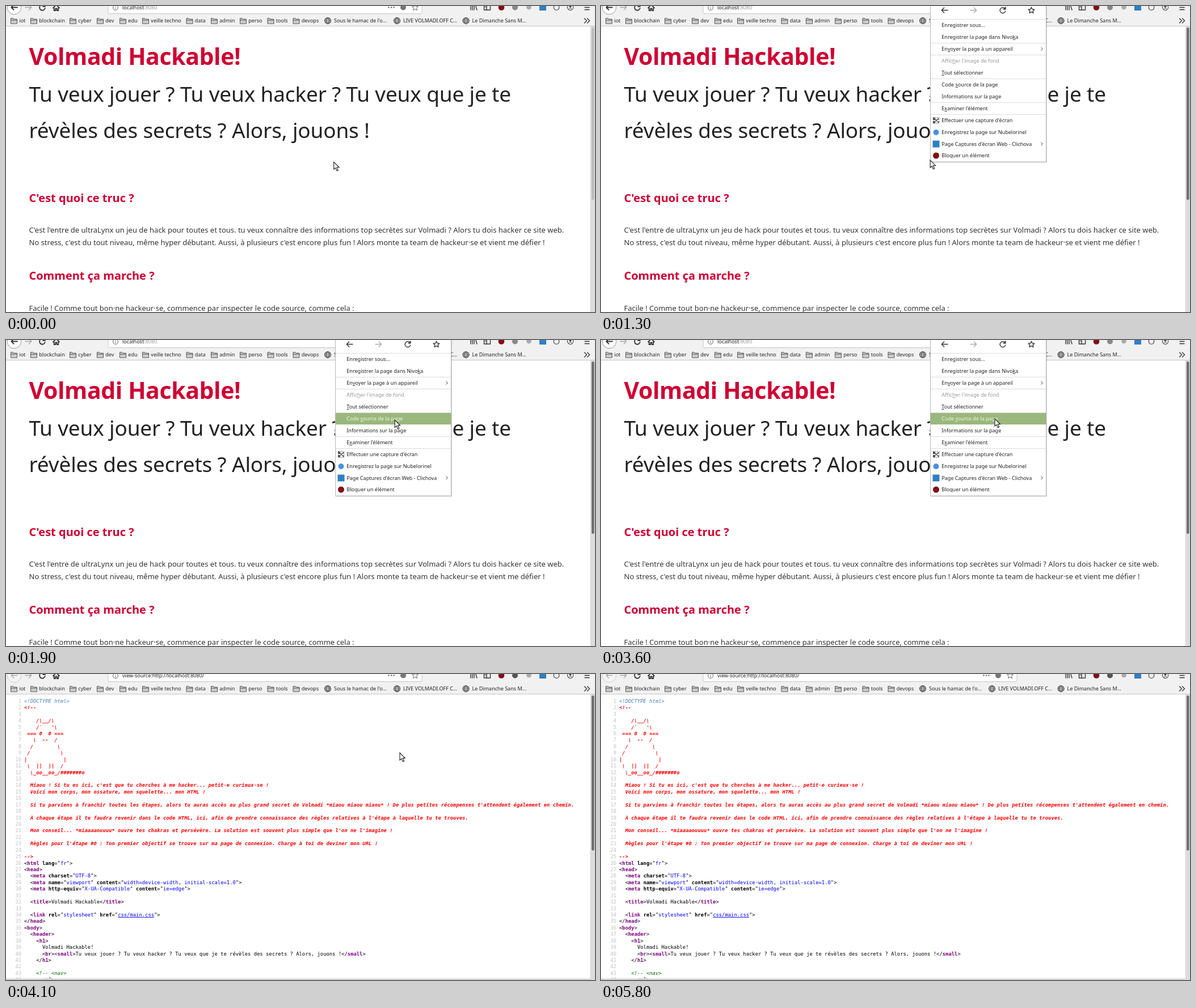
Recreate the animation shown at these times as an HTML page. Size 1038 by 540 pixels, loop 6.1 s.

```html
<!DOCTYPE html>
<html lang="fr">
<head>
<meta charset="utf-8">
<title>Code source de la page</title>
<style>
  html, body { margin: 0; width: 100%; height: 100%; overflow: hidden; background: #fff; }
  svg { display: block; width: 100%; height: 100%; }
  text { white-space: pre; font-family: "Noto Sans", "Open Sans", sans-serif; font-size: 9.05px; fill: #222; }
  .line { fill: none; stroke: #333; stroke-width: 1.4; stroke-linecap: round; stroke-linejoin: round; }
  .thin { stroke-width: 1; }
  .bold { stroke-width: 1.8; }
  .grey { stroke: #666; }
  .off { stroke: #aaa; }
  .folder { fill: #ccc; stroke: #555; }
  .red { font-weight: bold; fill: #ce0033; }
  .h1 { font-size: 41px; letter-spacing: -.4px; }
  .h3 { font-size: 20px; }
  .lead { font-size: 37px; letter-spacing: -.17px; }
  .body { font-size: 13px; fill: #333; }
  .key { text-decoration: underline; }
  .mono text { font-family: "DejaVu Sans Mono", monospace; font-size: 8.86px; fill: #000; }
  .mono .num { fill: #c2c2c2; text-anchor: end; }
  .mono .err { fill: #f00; font-weight: bold; font-style: italic; }
  .mono .doctype { fill: #4682b4; font-style: italic; }
  .mono .com { fill: #006400; font-style: italic; }
  .tag { fill: #800080; font-weight: bold; }
  .attr { font-weight: bold; }
  .val { fill: #00f; }
</style>
</head>
<body>
<svg id="stage" viewBox="0 0 1038 540" xml:space="preserve"></svg>

<script type="text/plain" id="listing">
<!DOCTYPE html>
<!--

    /\__/\
    /`   '\
 === 0  0 ===
   \  --  /
  /        \
 /          \
|            |
 \  ||  ||  /
  \_oo__oo_/#######o

  Miaou ! Si tu es ici, c'est que tu cherches à me hacker... petit·e curieux·se !
  Voici mon corps, mon ossature, mon squelette... mon HTML !

  Si tu parviens à franchir toutes les étapes, alors tu auras accès au plus grand secret de Volmadi *miaou miaou miaou* ! De plus petites récompenses t'attendent également en chemin.

  À chaque étape il te faudra revenir dans le code HTML, ici, afin de prendre connaissance des règles relatives à l'étape à laquelle tu te trouves.

  Mon conseil... *miaaaaouuuu* ouvre tes chakras et persévère. La solution est souvent plus simple que l'on ne l'imagine !

  Règles pour l'étape #0 : Ton premier objectif se trouve sur ma page de connexion. Charge à toi de deviner mon URL !

-->
<html lang="fr">
<head>
  <meta charset="UTF-8">
  <meta name="viewport" content="width=device-width, initial-scale=1.0">
  <meta http-equiv="X-UA-Compatible" content="ie=edge">

  <title>Volmadi Hackable</title>

  <link rel="stylesheet" href="css/main.css">
</head>
<body>
  <header>
    <h1>
      Volmadi Hackable!
      <br><small>Tu veux jouer ? Tu veux hacker ? Tu veux que je te révèles des secrets ? Alors, jouons !</small>
    </h1>

    <!-- <nav>
      <ul>
</script>

<script>
const LOOP = 6100;
const $ = id => document.getElementById(id);

const rect = (x, y, w, h, fill, extra = '') =>
  `<rect x="${x}" y="${y}" width="${w}" height="${h}" fill="${fill}" ${extra}/>`;
const disc = (x, y, r, fill, extra = '') => `<circle cx="${x}" cy="${y}" r="${r}" fill="${fill}" ${extra}/>`;
const text = (x, y, str, cls = '', extra = '') => `<text x="${x}" y="${y}" class="${cls}" ${extra}>${str}</text>`;
const icon = (x, y, d, cls = '', extra = '') =>
  `<path transform="translate(${x} ${y})" d="${d}" class="line ${cls}" ${extra}/>`;
const group = (id, body, extra = '') => `<g id="${id}" ${extra}>${body}</g>`;

const LEFT = 'M5.5 0H-5M-.8 -4.4L-5.2 0L-.8 4.4';
const RIGHT = 'M-5.5 0H5M.8 -4.4L5.2 0L.8 4.4';
const RELOAD = 'M3.6 -3.2A4.9 4.9 0 1 0 4.8 1.4M4.9 -5.2V-1.6H1.3Z';
const STOP = 'M-4.5 -4.5L4.5 4.5M4.5 -4.5L-4.5 4.5';
const HOME = 'M-5.5 .3L0 -5L5.5 .3M-3.8 0V5H-1.2V1.5H1.2V5H3.8V0';
const STAR = 'M0 -5.3L1.6 -1.8L5.4 -1.4L2.6 1.2L3.4 5L0 3L-3.4 5L-2.6 1.2L-5.4 -1.4L-1.6 -1.8Z';
const GLOBE = 'M-5.5 0A5.5 5.5 0 1 0 5.5 0A5.5 5.5 0 1 0 -5.5 0H5.5M0 -5.5C-3.6 -2 -3.6 2 0 5.5C3.6 2 3.6 -2 0 -5.5M-4.6 -2.8H4.6M-4.6 2.8H4.6';
const FOLDER = 'M-5.5 4.8V-4.3H-1.5L-.3 -2.8H5.5V4.8ZM-5.5 -1H5.5';
const INFO = 'M-4.5 0A4.5 4.5 0 1 0 4.5 0A4.5 4.5 0 1 0 -4.5 0M0 -.3V2.2M0 -2.3V-2.2';
const LENS = 'M-4 -1A3.7 3.7 0 1 0 3.4 -1A3.7 3.7 0 1 0 -4 -1M2.5 2L6 5.5';
const SCISSORS = 'M-2.5 -2.5L4.5 3.5M-2.5 2.5L4.5 -3.5M-4.8 -3A1.3 1.3 0 1 0 -2.2 -3A1.3 1.3 0 1 0 -4.8 -3M-4.8 3A1.3 1.3 0 1 0 -2.2 3A1.3 1.3 0 1 0 -4.8 3';
const ARROW = 'M0 0V13L3 10.3L5.3 15.6L7.6 14.6L5.3 9.5H9.4Z';

function toolbar() {
  const folders = [['iot', 8], ['blockchain', 43], ['cyber', 112], ['dev', 160], ['edu', 200], ['veille techno', 240],
    ['data', 317.5], ['admin', 361], ['perso', 412], ['tools', 460.5], ['devops', 505.5]];
  const links = [["Sous le hamac de l'o...", 567], ['LIVE VOLMADI.OFF C...', 689], ['Le Dimanche Sans M...', 810.5]];
  return rect(0, 0, 1038, 36, '#f1f1f1') + rect(0, 35, 1038, 1, '#c6c6c6') +
    rect(180, -12, 553, 25.5, '#fff', 'rx="2" stroke="#c4c4c4"') +
    group('back', disc(14.5, 2.5, 12.3, '#fff', 'stroke="#999"') + icon(14.5, 2.5, LEFT, 'bold')) +
    group('backOff', disc(14.5, 2.5, 12.3, '#f4f4f4', 'stroke="#ccc"') + icon(14.5, 2.5, LEFT, 'off')) +
    icon(39.5, 2.5, RIGHT, 'off') + group('reload', icon(64, 2.5, RELOAD, 'bold')) + group('stop', icon(64, 2.5, STOP)) +
    icon(88.5, 3, HOME, 'bold') +
    group('loaded', icon(193, 3, INFO, 'thin grey') +
      [-4.5, 0, 4.5].map(dx => disc(679 + dx, 2.5, 1.2, '#666')).join('') +
      disc(700, 2.5, 5, '#777') + icon(721, 2.5, STAR, 'thin grey')) +
    group('search', icon(192, 2, LENS, 'grey')) +
    text(205, 6.3, '', '', 'id="url"') +
    icon(824, 2.5, 'M-5 -6V4.5M-2 -6V4.5M1 -6V4.5M3 -5L6 4.5') +
    icon(848, 2.5, 'M-5.5 -6V4.5H5.5V-6M-1 -6V4.5M-3.7 -1H-2.7') +
    disc(873, 2.5, 5.3, '#800f17') + disc(897, 2.5, 5, '#888', 'id="addon"') + disc(921.5, 2, 4.3, '#aaa') +
    rect(940, -4, 12, 12, '#2f7fc4') + disc(970, 2.5, 4.8, 'none', 'stroke="#555" stroke-width="1.3"') +
    icon(994.5, 2.5, 'M-5.2 0A5.2 5.2 0 1 0 5.2 0A5.2 5.2 0 1 0 -5.2 0M-3 3.4C-2 1.2 2 1.2 3 3.4', 'thin') +
    disc(994.5, 1, 1.9, '#444') + icon(1024, 2.5, 'M-4 -4H4M-4 0H4M-4 4H4') +
    folders.map(([name, x]) => icon(x + 6, 26, FOLDER, 'thin folder') + text(x + 15.3, 29, name)).join('') +
    links.map(([name, x]) => icon(x, 26, GLOBE, 'thin') + text(x + 11, 29, name)).join('') +
    icon(1024, 26, 'M-4.5 -4L-.5 0L-4.5 4M.5 -4L4.5 0L.5 4');
}

function homePage() {
  return text(40.5, 104, 'Volmadi Hackable!', 'red h1') +
    text(40.5, 168.5, 'Tu veux jouer ? Tu veux hacker ? Tu veux que je te', 'lead') +
    text(40.5, 232.5, 'révèles des secrets ? Alors, jouons !', 'lead') +
    text(40.5, 345.5, "C'est quoi ce truc ?", 'red h3') +
    text(40.5, 400, "C'est l'entre de ultraLynx un jeu de hack pour toutes et tous. tu veux connaître des informations top secrètes sur Volmadi ? Alors tu dois hacker ce site web.", 'body') +
    text(40.5, 421.5, "No stress, c'est du tout niveau, même hyper débutant. Aussi, à plusieurs c'est encore plus fun ! Alors monte ta team de hackeur·se et vient me défier !", 'body') +
    text(40.5, 482.5, 'Comment ça marche ?', 'red h3') +
    text(40.5, 538, 'Facile ! Comme tout bon·ne hackeur·se, commence par inspecter le code source, comme cela :', 'body');
}

const escape = s => s.replace(/</g, '&lt;');
const span = (cls, s) => `<tspan class="${cls}">${s}</tspan>`;

function highlight(line) {
  return line.replace(/<(\/?)(\w+)|([\w-]+)(?==")|"([^"]*)"/g, (all, slash, tag, attr, val) => {
    if (tag) return '&lt;' + slash + span('tag', tag);
    if (attr) return span('attr', attr);
    return '"' + span(val.endsWith('.css') ? 'val key' : 'val', val) + '"';
  });
}

function sourcePage() {
  const lines = $('listing').textContent.slice(1).trimEnd().split('\n');
  return lines.map((line, i) => {
    const n = i + 1, y = (50.8 + i * 11.43).toFixed(2);
    const cls = n === 1 ? 'doctype' : n <= 25 ? 'err' : n >= 43 ? 'com' : '';
    return text(27.2, y, n, 'num') + text(32, y, cls ? escape(line) : highlight(line), cls);
  }).join('') + rect(0, 537.5, 1030, 2.5, '#d2d2d2');
}

// An underscore marks the access key
const ITEMS = [['Enregistrer sous...', 34], ['Enregistrer la page dans Nivo_ka', 54.5], ['En_voyer la page à un appareil', 75.7],
  ["Affic_her l'image de fond", 97], ['_Tout sélectionner', 117.6], ['Code _source de la page', 139],
  ['Informations sur la page', 159.6], ["E_xaminer l'élément", 181], ["Effectuer une capture d'écran", 202],
  ['Enregistrez la page sur Nubelorinel', 222.7], ["Page Captures d'écran Web - Clichova", 243.3], ['Bloquer un élément', 264]];

function contextMenu() {
  const chevron = y => icon(777, y, 'M-1.2 -2.5L1.3 0L-1.2 2.5', 'thin');
  return rect(581, -5, 205, 281.5, '#000', 'opacity=".16"') +
    rect(580.5, -5, 204, 280, '#fff', 'stroke="#b5b5b5"') +
    icon(605.5, 7.5, LEFT) + icon(656.5, 7.5, RIGHT, 'off') + icon(708, 7.5, RELOAD) + icon(758.5, 7.5, STAR) +
    [23, 65, 86, 128, 170, 191].map(y => rect(581, y, 203, 1, '#dcdcdc')).join('') +
    rect(581, 129, 203.5, 20.3, '#9ab87c', 'id="hover"') +
    ITEMS.map(([s, y], i) => text(600.3, y + 3.3, s.replace(/_(.)/, (m, c) => span('key', c)), '', `id="item${i}"`)).join('') +
    chevron(75.7) + chevron(243.3) +
    icon(590.5, 202, 'M-5 -5H5V5H-5Z', 'thin', 'stroke-dasharray="1 2.3"') + icon(590.5, 202, SCISSORS) +
    disc(590.5, 223, 5, '#4a90e2') + rect(584.5, 237.5, 12, 12, '#2f7fc4') + disc(590.5, 264, 5.5, '#800f17');
}

$('stage').innerHTML = rect(0, 0, 1038, 540, '#fff') + group('home', homePage()) +
  group('source', sourcePage(), 'class="mono"') +
  group('scroll', rect(1029.5, 36, 8.5, 504, '#dcdcdc') + rect(1032, 38, 4.6, 304, '#bbb', 'id="thumb" rx="2"')) +
  toolbar() + group('menu', contextMenu()) +
  `<path id="cursor" d="${ARROW}" fill="#fff" stroke="#1a1a1a" stroke-width="1.1"/>`;

// Late pointer stops: [time, x, y]
const STOPS = [[3600, 694, 139], [4700, 612, 168], [4800, 403.5, 212], [4900, 489, 221],
  [5100, 301.5, 161.5], [5200, 306.5, 164], [5600, 211.5, 110.5]];

function pointer(t) {
  if (t < 3600) {
    const p = Math.min(7, Math.max(0, Math.floor((t - 1200) / 100))) / 7;
    const e = p * p * p * (p * (p * 6 - 15) + 10);
    return [577.7 + 107.5 * e, 275.3 - 134 * e];
  }
  return STOPS.filter(s => s[0] <= t).pop().slice(1);
}

const URLS = {
  home: `localhost<tspan fill="#999">:8080</tspan>`,
  blank: `<tspan fill="#888">Saisir un terme à rechercher ou une adresse</tspan>`,
  source: 'view-source:http://localhost:8080/'
};
let view;

function show(id, on) { $(id).style.display = on ? '' : 'none'; }

function render(t) {
  const now = t < 3900 ? 'home' : t < 4100 ? 'blank' : 'source';
  if (now !== view) {
    view = now;
    $('url').innerHTML = URLS[now];
    show('home', now === 'home');
    show('source', now === 'source');
    show('back', now === 'home');
    show('backOff', now !== 'home');
    for (const id of ['scroll', 'reload', 'loaded']) show(id, now !== 'blank');
    for (const id of ['stop', 'search']) show(id, now === 'blank');
    $('thumb').setAttribute('height', now === 'source' ? 273.5 : 304);
    $('addon').setAttribute('fill', now === 'home' ? '#888' : '#555');
  }
  $('thumb').setAttribute('fill', t < 400 ? '#bcbcbc' : t < 500 ? '#9a9a9a' : '#707070');

  const [x, y] = pointer(t);
  $('cursor').setAttribute('transform', `translate(${x} ${y})`);
  show('cursor', t < 5800);

  show('menu', t >= 400 && t < 3900);
  const row = t >= 1400 && x > 581 ? ITEMS.findIndex(it => Math.abs(it[1] - y) <= 10.3) : -1;
  show('hover', row >= 0);
  if (row >= 0) $('hover').setAttribute('y', ITEMS[row][1] - 10.2);
  ITEMS.forEach((it, i) => { $('item' + i).style.fill = i === row ? '#f2f7ea' : i === 3 ? '#999' : ''; });
}

const start = performance.now();
function tick() {
  render((performance.now() - start) % LOOP);
  requestAnimationFrame(tick);
}
tick();
</script>
</body>
</html>
```
